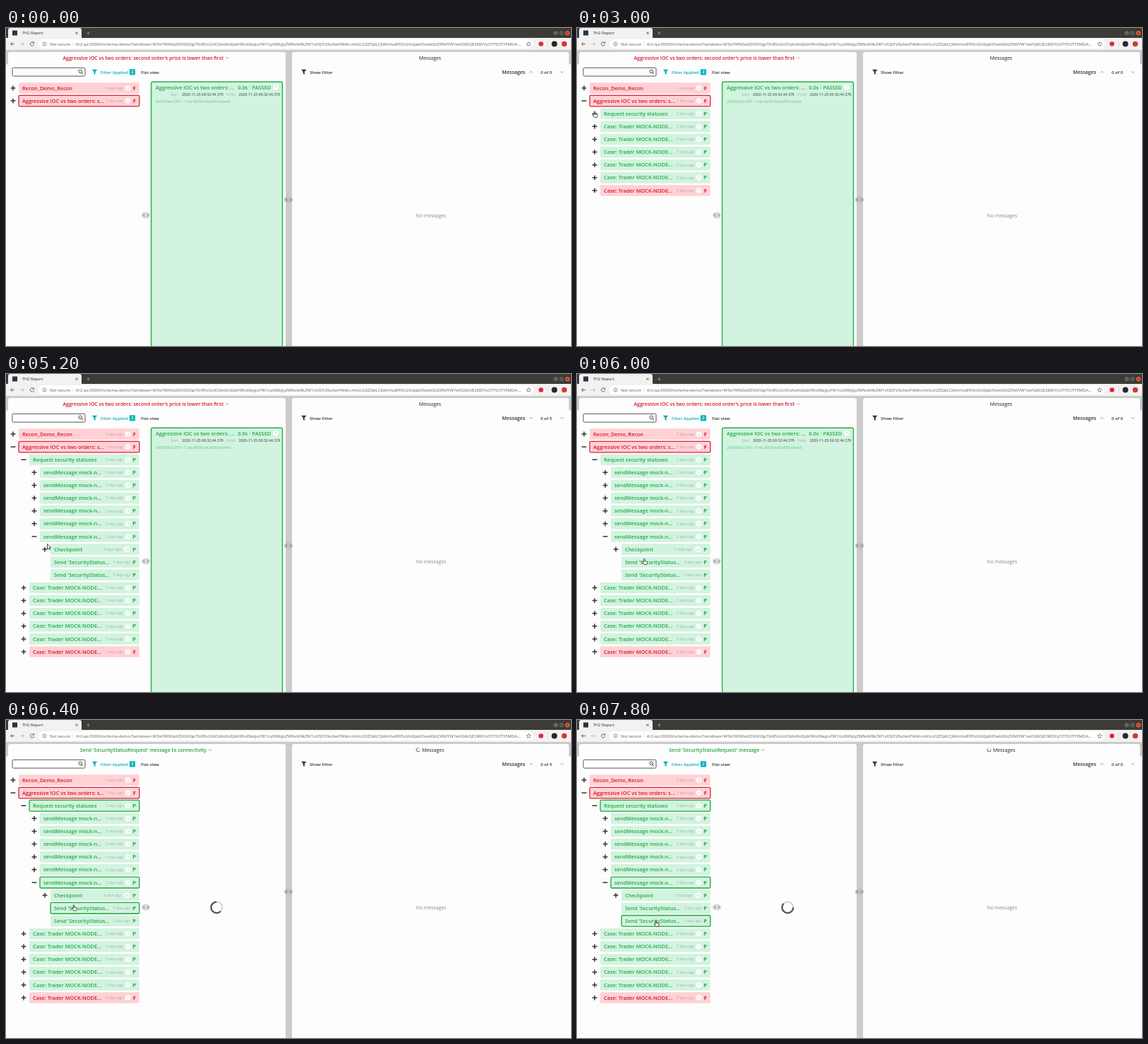
An HTML page for the animation above (8000 ms loop, 800 px wide and 450 px high).

```html
<!DOCTYPE html>
<html lang="en">
<head>
<meta charset="utf-8">
<title>TH2 Report</title>
<style>
html, body { margin: 0; width: 100%; height: 100%; overflow: hidden; background: #fff; }
svg { display: block; width: 100vw; height: 100vh; }
text { font-family: "Open Sans", sans-serif; white-space: pre; }
.ui { font-family: "Noto Sans", sans-serif; }
</style>
</head>
<body>
<svg id="stage" viewBox="0 0 800 450"><g id="base"></g><g id="live"></g></svg>
<script>
const LOOP = 8000, STEP = 200;
const GREEN = '#20ab43', RED = '#d3162b', INK = '#333';
const MINT = '#d2f3df', PINK = '#ffd1d5';

const rect = (x, y, w, h, fill, more = '') =>
  `<rect x="${x}" y="${y}" width="${w}" height="${h}" fill="${fill}" ${more}/>`;
const circle = (x, y, r, fill, more = '') =>
  `<circle cx="${x}" cy="${y}" r="${r}" fill="${fill}" ${more}/>`;
const line = (d, color, width = 1, more = '') =>
  `<path d="${d}" fill="none" stroke="${color}" stroke-width="${width}" ${more}/>`;
const text = (x, y, s, size, fill, weight = 400, more = '') =>
  `<text x="${x}" y="${y}" font-size="${size}" fill="${fill}" font-weight="${weight}" ${more}>${s}</text>`;
const MID = 'text-anchor="middle"';
const UI = 'class="ui"';

const chevron = (x, y, dir, r = 2.4) =>
  line(`M${x - r} ${y - dir * r / 2}l${r} ${dir * r}l${r} ${-dir * r}`, '#777', 0.7);
const funnel = (x, y, fill) =>
  `<path d="M${x - 3.7} ${y - 3.5}h7.4l-2.7 3.3v3.8l-2 -1.2v-2.6z" fill="${fill}"/>`;
const handle = (x, y, fill) =>
  `<ellipse cx="${x}" cy="${y}" rx="6.2" ry="4.5" fill="${fill}"/>` +
  line(`M${x - 2} ${y - 1.6}l-1.7 1.6l1.7 1.6M${x + 2} ${y - 1.6}l1.7 1.6l-1.7 1.6`, '#555', 0.8);
const badge = (x, y, s) =>
  rect(x - 3.2 - s.length * 0.6, y - 3.8, 6.4 + s.length * 1.2, 7.6, '#fff', 'rx="3.8"') +
  text(x, y + 1.5, s, 4.2, '#999', 400, MID);
const spinner = (x, y, r, w, angle) =>
  circle(x, y, r, 'none', `stroke="#d6d6d6" stroke-width="${w}"`) +
  circle(x, y, r, 'none', `stroke="#555" stroke-width="${w}" pathLength="100"
    stroke-dasharray="62 38" transform="rotate(${angle} ${x} ${y})"`);

const ADDRESS = 'th2-qa:30000/schema-demo/?windows=W3siYWN0aXZlVGFiIjp7InR5cGUiOiJAsImZpbHRlciI6' +
  'eyJuYW1lcyI6WyJyZWNvbl9kZW1vX3JlY29uIiwiYWdncmVzc2l2ZSJdLCJldmVudFR5cGVzIjpbXSwidGltZXN0YW1w' +
  'VG8iOjE2MDYyOTY5OTY5MDAwLCJ0aW1l';

function browser() {
  return rect(0, 0, 800, 15, '#3c3b37') +
    `<path d="M1 15q2 0 2 -2v-10q0 -3 3 -3h98q3 0 3 3v10q0 2 2 2z" fill="#f3f2f1"/>` +
    rect(9, 3.5, 7, 7, '#21394a') +
    text(23, 9.2, 'TH2 Report', 5.6, '#333', 400, UI) +
    line('M98.3 5.5l3.4 3.4m0 -3.4l-3.4 3.4', '#444', 0.8) +
    line('M116.5 4.7v5m-2.5 -2.5h5', '#99968f', 0.8) +
    circle(778.5, 7.3, 3, '#6b6a64') + circle(786.5, 7.3, 3, '#6b6a64') +
    circle(795, 7.3, 3.3, '#e75a2c') +
    line('M777 8h3M785.2 6h2.6v2.6h-2.6z', '#2f2e2b', 0.6) +
    line('M793.8 6.1l2.4 2.4m0 -2.4l-2.4 2.4', '#4b2012', 0.7) +
    rect(0, 14, 800, 17, '#f3f2f1') +
    rect(46, 16, 701, 13, '#fff', 'rx="6.5"') +
    line('M12 22.5h-5.5m2.5 -2.5l-2.5 2.5l2.5 2.5', '#5c5c5c', 0.9) +
    line('M20 22.5h5.5m-2.5 -2.5l2.5 2.5l-2.5 2.5', '#bbb', 0.9) +
    line('M39 20.6a2.7 2.7 0 1 0 .7 2.4M39.6 19.4v1.9h-1.9', '#5c5c5c', 0.9) +
    circle(54.5, 22.5, 2.6, 'none', 'stroke="#666" stroke-width=".7"') +
    line('M54.5 22.2v1.8M54.5 20.8v.7', '#666', 0.7) +
    text(62, 24.5, 'Not secure', 5.7, '#666', 400, UI) +
    line('M95 19v7', '#ccc', 0.5) +
    `<svg x="98" y="15" width="626.5" height="15">${text(1, 9.5, ADDRESS, 5.8, '#666', 400, UI)}</svg>` +
    text(724.5, 24.5, '...', 5.8, '#666', 400, UI) +
    line('M740 19.4l.9 2.1l2.3 .2l-1.8 1.5l.6 2.2l-2 -1.2l-2 1.2l.6 -2.2l-1.8 -1.5l2.3 -.2z', '#555', 0.6) +
    circle(757.5, 22.5, 3.3, '#e2263d') +
    line('M767 18v9', '#ccc', 0.5) +
    circle(776.5, 22.5, 4, '#26282b') + circle(790.5, 22.5, 3.8, '#cf3b36');
}

function page() {
  return rect(0, 31, 800, 419, '#cbcbcb') +
    rect(0, 51.5, 396, 399, '#fdfdfd') + rect(405, 51.5, 395, 399, '#fdfdfd') +
    `<path d="M3 52v-15q0 -3 3 -3h387q3 0 3 3v15zM405 52v-15q0 -3 3 -3h386q3 0 3 3v15z" fill="#fdfdfd"/>` +
    rect(9, 56.3, 103, 11.8, '#fff', 'rx="1.5" stroke="#555" stroke-width="1"') +
    circle(105.2, 61.3, 2.3, 'none', 'stroke="#333" stroke-width=".9"') +
    line('M106.9 63l2.2 2.2', INK, 1) +
    funnel(125.5, 62.3, '#07adb5') +
    text(134, 64.7, 'Filter Applied', 6.05, '#07adb5', 600) +
    rect(174.8, 58.2, 8.2, 8.2, '#07b5bd', 'rx="1"') +
    text(178.9, 64.4, '2', 5.8, '#fff', 600, MID) +
    text(191, 64.7, 'Flat view', 6.1, INK, 600) +
    funnel(421.7, 62.3, INK) +
    text(430, 64.7, 'Show Filter', 6.1, INK, 600) +
    text(702.3, 64.9, 'Messages', 7.05, INK, 600) +
    chevron(743.5, 62.3, -1) + text(757, 64.7, '0 of 0', 6.1, INK, 600) + chevron(787, 62.3, 1) +
    text(602, 267.6, 'No messages', 6.85, '#888', 400, MID) +
    handle(400, 243, '#c0c0c0');
}

// Event tree: level, label, status, count, expander
const AGG = 'Aggressive IOC vs two orders: ';
function tree(t) {
  const open = t >= 2000, opened = t >= 3400, deep = t >= 4600;
  const rows = [[0, 'Recon_Demo_Recon', 'F', '4', '+'], [0, AGG + 's...', 'F', '7', open ? '-' : '+', 'sel']];
  if (!open) return rows;
  const picked = t >= 6200 ? 'sel' : '';
  const second = t >= 7800;
  rows.push([1, 'Request security statuses', 'P', '6', opened ? '-' : '+', picked]);
  if (opened) for (let i = 0; i < 6; i++) {
    const last = i === 5;
    rows.push([2, 'sendMessage mock-n...', 'P', '3', last && deep ? '-' : '+', last ? picked : '']);
  }
  if (deep) {
    const send = "Send 'SecurityStatus...";
    rows.push([3, 'Checkpoint', 'P', '10', '+'],
      [3, send, 'P', '', '', second ? '' : picked],
      [3, send, 'P', '', '', second ? 'sel' : t >= 7000 ? 'hover' : '']);
  }
  for (let i = 0; i < 6; i++) {
    const bad = i === 5;
    rows.push([1, 'Case: Trader MOCK-NODE...', bad ? 'F' : 'P', bad ? '1' : '7', '+']);
  }
  return rows;
}

function row([level, label, status, count, icon, mark], i) {
  const x = 18 + level * 15, y = 85 + i * 18.12, ok = status === 'P';
  const color = ok ? GREEN : RED;
  const edge = !mark ? '' : `stroke="${ok ? '#18a83a' : '#dc2038'}" stroke-width="${mark === 'sel' ? 1.3 : 0.6}"`;
  const ageEnd = !count ? 176.5 : count.length > 1 ? 163.3 : 166.3;
  return rect(x, y - 7.8, 170.8 - level * 15, 15.6, ok ? MINT : PINK, `rx="1.6" ${edge}`) +
    text(x + 5, y + 2.6, label, 7.36, color, 600) +
    text(ageEnd, y + 1.8, '5 days ago', 5.05, ok ? '#96b8a2' : '#c99da2', 400, 'text-anchor="end"') +
    (count ? badge(count.length > 1 ? 171.3 : 172.6, y, count) : '') +
    text(181.7, y + 2.6, status, 7.4, color, 700, MID) +
    (icon ? line(`M${x - 11.4} ${y}h6.8` + (icon === '+' ? `m-3.4 -3.4v6.8` : ''), INK, 1.5) : '');
}

function details(label, id, stamp, right) {
  const dates = [[233, 'Start', 249], [312, 'Finish', 329.5]].map(([x, name, dx]) =>
    text(x, 95.9, name, 4.9, '#9cb5a5') + text(dx, 95.9, `2020-11-25 09:32:44.${stamp}`, 5.15, '#56685c', 600)).join('');
  return rect(205.6, 76.2, 185.8, 390, MINT, 'rx="2" stroke="#20b246" stroke-width="1.4"') +
    text(212, 86.7, label, 7.3, GREEN, 600) +
    text(right - 47, 86.7, '0.0s', 7.36, GREEN, 600) +
    line(`M${right - 29.8} 80.5v7`, '#8bd3a0', 0.6) +
    text(right, 86.7, 'PASSED', 7.36, GREEN, 600, 'text-anchor="end"') +
    dates + text(212, 106.4, id, 5.5, '#5bcb7c');
}

function table() {
  const cells = [['SecurityStatusReqID', 'INSTR6'], ['SecurityID', 'INSTR6'], ['SecurityIDSource', '8']];
  return rect(212, 111.3, 174.5, 10.8, '#0783c9') + text(302, 118.3, 'fieldValue', 5.75, '#fff', 600) +
    cells.map(([name, value], i) => {
      const y = 122.1 + i * 10.4;
      return rect(212, y, 174.5, 10.4, '#fff') + line(`M212 ${y + 10.2}h174.5`, '#ccd5d0', 0.4) +
        text(217, y + 7.3, name, 5.73, INK) + text(302, y + 7.3, value, 5.73, INK);
    }).join('');
}

// Pointer path: time, x, y, hand
const PATH = [
  [200, 786, 16, 0], [400, 600, 110, 0], [600, 380, 172, 0], [800, 190, 168, 0], [1000, 80, 130, 0],
  [1200, 17, 104, 0], [1400, 13, 103, 1], [2600, 16, 107, 0], [3000, 25.5, 122.5, 1], [3600, 25.5, 122.5, 0],
  [4000, 34, 180, 0], [4400, 40, 230, 1], [4800, 41, 231, 0], [5200, 58.5, 240.5, 0], [5600, 80, 256, 1],
  [6000, 96, 265.5, 1], [6600, 97, 266, 1], [7000, 111.5, 287, 1], [7600, 112.7, 288.2, 1], [8000, 112.7, 288.2, 1]
];

function pointer(t) {
  if (t < PATH[0][0]) return '';
  const k = PATH.findIndex((p, i) => t >= p[0] && t < PATH[i + 1][0]);
  const a = PATH[k], b = PATH[k + 1], u = (t - a[0]) / (b[0] - a[0]);
  const x = a[1] + (b[1] - a[1]) * u, y = a[2] + (b[2] - a[2]) * u;
  const d = a[3]
    ? 'M-1.4 .8v-4q0 -.9 .7 -.9t.7 .9v2.4l2.8 .5q.8 .2 .8 1l-.4 2.2l-.6 1.1h-3.6l-2.3 -3q-.4 -.9 .4 -1z'
    : 'M0 0v7.2l1.7 -1.6l1.2 2.8l1.3 -.6l-1.2 -2.7h2.3z';
  return `<path d="${d}" transform="translate(${x} ${y})" fill="#fff" stroke="#222" stroke-width=".8" stroke-linejoin="round"/>`;
}

function draw(t) {
  const busy = (t >= 6200 && t < 6600) || t >= 7800;
  const angle = (t % 1600) / 1600 * 360 + 45;
  const [title, end] = t < 6200 ? [AGG + "second order's price is lower than first", 313.3]
    : t < 7800 ? ["Send 'SecurityStatusRequest' message to connectivity", 289]
    : ["Send 'SecurityStatusRequest' message", 263.3];
  let out = text(194.2, 44.5, title, 6.93, t < 6200 ? RED : '#20a43f', 600, MID) + chevron(end, 42.4, 1, 2) +
    text(busy ? 589 : 584.7, 44.5, 'Messages', 6.9, '#222');
  if (busy) out += spinner(583.6, 42.2, 2.6, 0.9, angle) + spinner(298.3, 265.2, 7.9, 2.3, angle);
  else if (t < 6200) out += details(AGG + '...', '2bf590e2-2f01-11eb-8000-b42e991ede4d', '379', 375.2) + badge(382, 83.8, '7');
  else out += details('Outgoing message', '2c2f9307-2f01-11eb-b69b-6b69a8882377', '772', 386) + table();
  return out + tree(t).map(row).join('') + handle(198, 265, '#d9d9d9') + pointer(t);
}

const live = document.getElementById('live');
document.getElementById('base').innerHTML = page() + browser();
let shown = -1;
function tick() {
  const t = Math.floor(performance.now() % LOOP / STEP) * STEP;
  if (t !== shown) live.innerHTML = draw(shown = t);
  requestAnimationFrame(tick);
}
tick();
</script>
</body>
</html>
```
